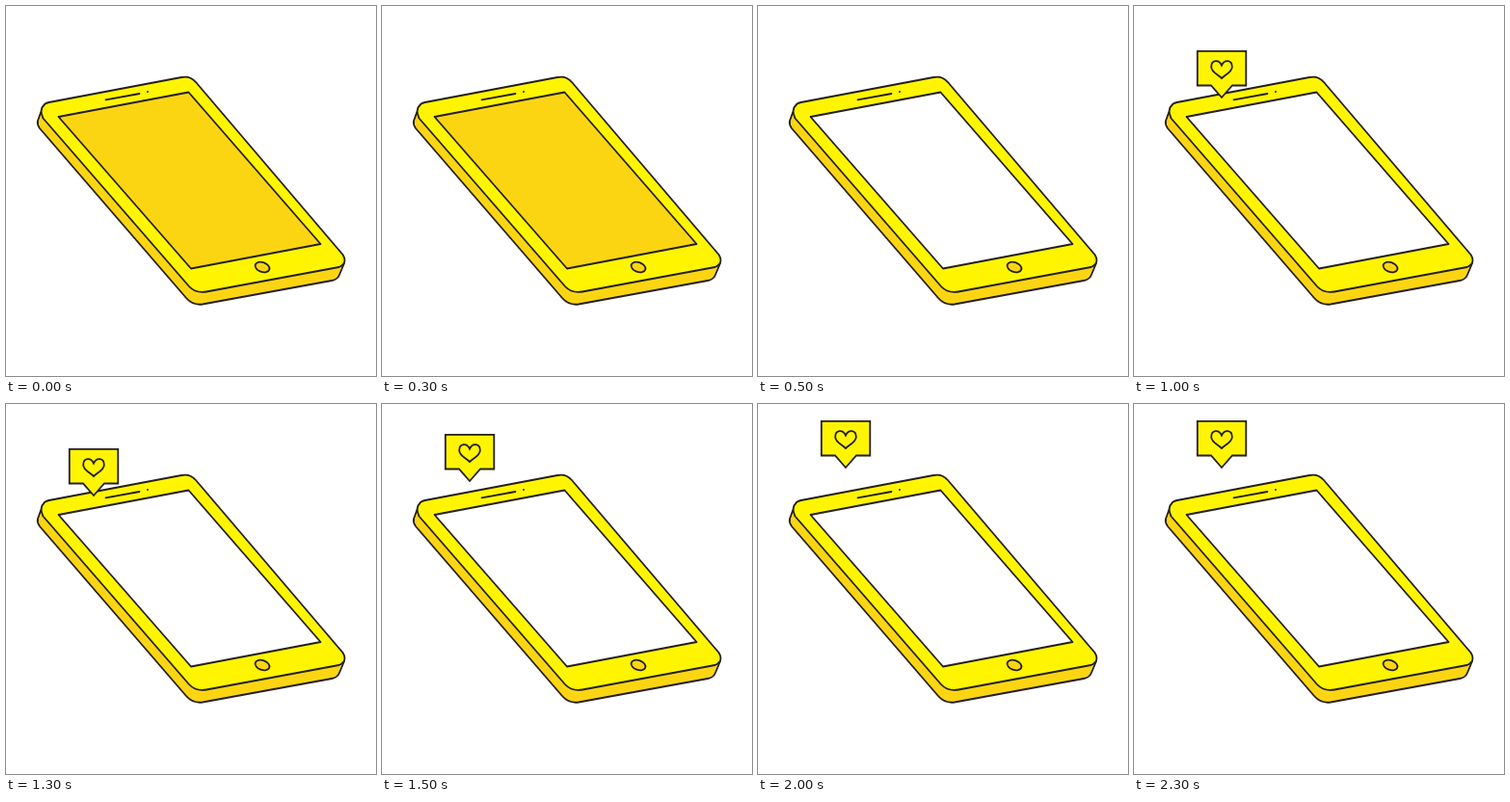
Animation of 384 by 384 pixels, one loop 2.5 s. Source, as an HTML page without scripts:

```html
<!DOCTYPE html>
<html lang="en">
<head>
<meta charset="utf-8">
<title>Phone like</title>
<style>
  html, body { margin: 0; width: 100%; height: 100%; overflow: hidden; background: #fff; }
  svg { display: block; width: 100%; height: 100%; }
  .ink { stroke: #231f20; stroke-width: 1.8; stroke-linejoin: round; stroke-linecap: round; }
  .face { fill: #fff500; }
  .side { fill: #fcd512; }
  .screen { animation: switch-on 2.5s step-end infinite; }
  .bubble { animation: rise 2.5s step-end infinite; }
  .bubble .ink { stroke-linejoin: miter; }
  @keyframes switch-on {
    0% { fill: #fcd512; }
    20%, 100% { fill: #fff; }
  }
  @keyframes rise {
    0% { visibility: hidden; transform: none; }
    40% { visibility: visible; transform: none; }
    60% { visibility: visible; transform: translateY(-15px); }
    80%, 100% { visibility: visible; transform: translateY(-29px); }
  }
</style>
</head>
<body>
<svg viewBox="0 0 384 384">
  <g class="phone">
    <path class="ink side" d="M37 108L33 119Q32 123 35 127L187 303Q194 311 204 309.500L338 285Q344 284 346 279L351 267L200 250Z"/>
    <path class="ink face" d="M44.500 100L182 74Q191 72 197 79L349.500 258Q355 267 345.500 271L208 296.500Q197 298.500 190 291L38.500 116.500Q34 108 40 102Q42 100.500 44.500 100Z"/>
    <path class="ink screen" d="M54.500 115L189.500 89.500L326.500 247L192 272.500Z"/>
    <path class="ink" d="M103.500 97.300L138.500 91"/>
    <circle cx="147" cy="89" r="1" fill="#231f20"/>
    <ellipse class="ink side" cx="266" cy="271" rx="7.700" ry="5" transform="rotate(20 266 271)"/>
  </g>
  <g class="bubble">
    <path class="ink face" d="M65.800 46.800H116.300V82.500H102L91 95L80 82.500H65.800Z"/>
    <path class="ink face" d="M91 61.500C88 55 80.200 56 80.200 63.200C80.200 68.500 87 71 91 75C95 71 101.800 68.500 101.800 63.200C101.800 56 94 55 91 61.500Z"/>
  </g>
</svg>
</body>
</html>
```
